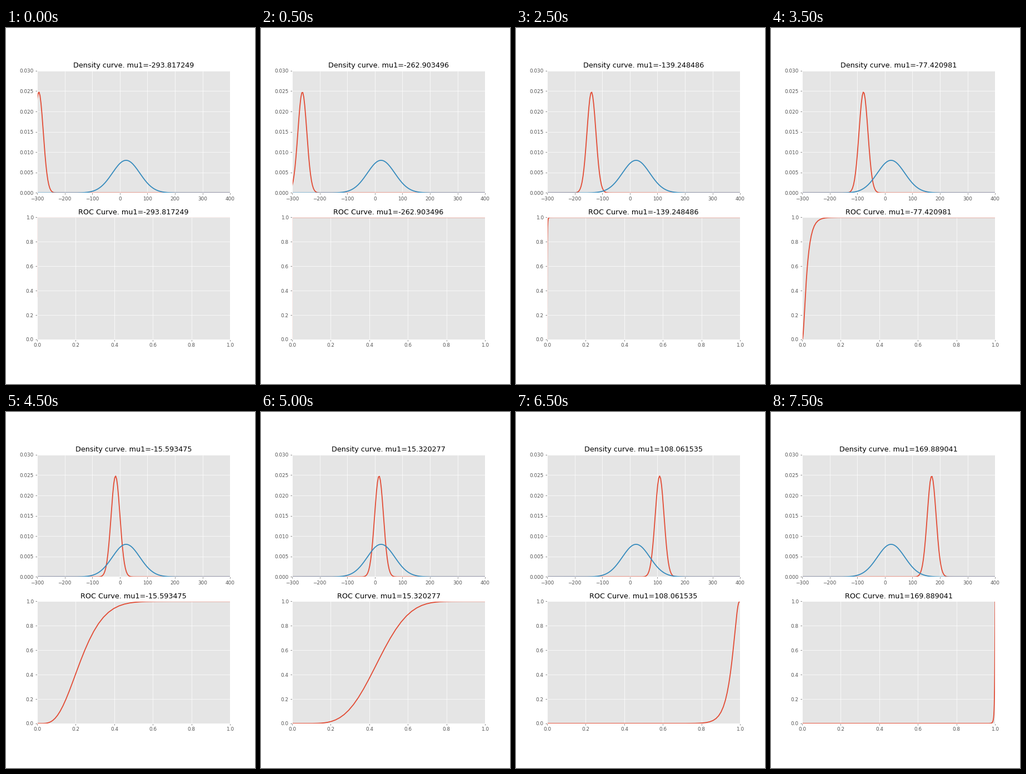
These frames come from a looping animation (448 px wide and 640 px high, 8 s). A matplotlib script:

```python
import math

import matplotlib.pyplot as plt
import numpy as np
from matplotlib.animation import FuncAnimation

FRAMES, INTERVAL = 16, 500
MU1_START, MU1_STEP, SIGMA1 = -293.817249, 30.91375264, 16.1
MU2, SIGMA2 = 22.6, 49.87

plt.style.use("ggplot")
plt.rcParams["font.family"] = "DejaVu Sans"

x = np.linspace(-300, 400, 200)
erf = np.vectorize(math.erf)


def pdf(x, mu, sigma):
    return np.exp(-((x - mu) / sigma) ** 2 / 2) / (sigma * math.sqrt(2 * math.pi))


def cdf(x, mu, sigma):
    return (1 + erf((x - mu) / (sigma * math.sqrt(2)))) / 2


fig, (ax_density, ax_roc) = plt.subplots(2, 1, figsize=(7, 10), dpi=64)
fig.subplots_adjust(left=0.125, right=0.9, bottom=0.125, top=0.88, hspace=0.2)

ax_density.set(xlim=(-300, 400), ylim=(0, 0.03))
ax_roc.set(xlim=(0, 1), ylim=(0, 1))

moving, = ax_density.plot([], [], lw=2)
ax_density.plot(x, pdf(x, MU2, SIGMA2), lw=2)
roc, = ax_roc.plot([], [], lw=2)
fixed_cdf = cdf(x, MU2, SIGMA2)


def update(frame):
    mu1 = MU1_START + MU1_STEP * frame
    moving.set_data(x, pdf(x, mu1, SIGMA1))
    roc.set_data(fixed_cdf, cdf(x, mu1, SIGMA1))
    ax_density.set_title(f"Density curve. mu1={mu1:f}")
    ax_roc.set_title(f"ROC Curve. mu1={mu1:f}")
    return moving, roc


anim = FuncAnimation(fig, update, frames=FRAMES, interval=INTERVAL, repeat=True)
plt.show()
```
